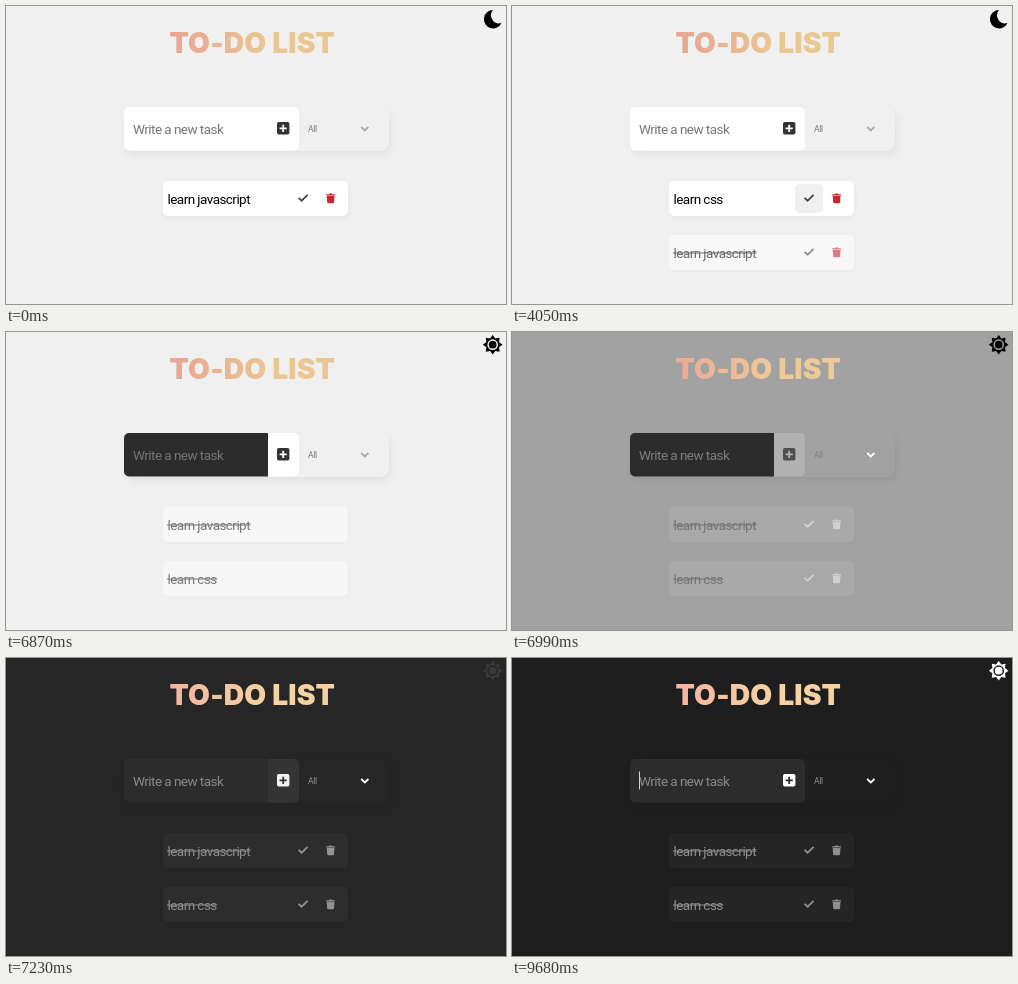
An HTML page for the animation above (9930 ms loop, 500 by 298 pixels).

```html
<!DOCTYPE html>
<html lang="en">
<head>
<meta charset="utf-8">
<title>To-do list</title>
<style>
  html, body { margin: 0; width: 100%; height: 100%; overflow: hidden; background: var(--bg); }
  svg { display: block; width: 500px; height: 298px; }
  text { font: 400 13.5px Roboto, sans-serif; letter-spacing: -.55px; white-space: pre; }
  .title { font: 900 28.2px Inter, sans-serif; letter-spacing: .2px; fill: url(#peach); }
  .small { font-size: 8.6px; letter-spacing: -.3px; fill: var(--all); }
  .panel { fill: var(--bg); filter: drop-shadow(2px 4px 4px rgba(0, 0, 0, .06)); }
  .field { fill: var(--field); }
  .button, .card { fill: var(--surface); }
  .card { filter: drop-shadow(1px 2px 2px rgba(0, 0, 0, .04)); }
  .hover { fill: var(--bg); }
  .label { fill: var(--text); }
  .line { fill: none; stroke-width: 1.8; }
  .strike { stroke: var(--text); stroke-width: 1; }
  .check { stroke: var(--icon); }
  .trash { fill: var(--trash); }
</style>
</head>
<body>
<svg viewBox="0 0 500 298">
  <defs>
    <linearGradient id="peach"><stop offset="0"/><stop offset=".6"/></linearGradient>
  </defs>
  <rect width="500" height="298" fill="var(--bg)"/>
  <text class="title" x="163.5" y="47.3">TO-DO LIST</text>

  <path id="moon" d="M487 4A9.2 9.2 0 1 0 495.5 17A8.1 8.1 0 0 1 487 4Z"/>
  <g id="sun" fill="var(--sun)">
    <path id="rays"/>
    <circle cx="486.7" cy="12.7" r="4.6" fill="none" stroke="var(--bg)" stroke-width="1.5"/>
  </g>

  <rect class="panel" x="118" y="101" width="265" height="44" rx="9"/>
  <path class="field" d="M262 101H123a5 5 0 0 0-5 5V139.5a5 5 0 0 0 5 5H262Z"/>
  <path class="button" d="M262 101H288a5 5 0 0 1 5 5V139.5a5 5 0 0 1-5 5H262Z"/>
  <text id="placeholder" x="127" y="128" fill="var(--hint)">Write a new task</text>
  <text id="typed" class="label" x="127" y="128"></text>
  <rect id="caret" class="label" y="113.5" width="1" height="18" opacity=".8"/>
  <rect id="plus" x="271" y="116" width="12.4" height="12.6" rx="1.8"/>
  <path class="line" stroke="var(--surface)" d="M273.6 122.3h7.2M277.2 118.7v7.2"/>
  <text class="small" x="302" y="126.2">All</text>
  <path class="line" stroke="var(--chevron)" d="M355.2 121l3.6 3.5 3.6-3.5"/>
  <g id="list"></g>
</svg>
<script>
const LOOP = 9930, TICK = 120, BLINK = 500;
const SENT = 2590, NIGHT = 6870, REFOCUS = 8680;
const $ = id => document.getElementById(id);
const root = document.documentElement;

// Transitions advance in ticks counted from these moments.
const transitions = [0, 2350, 3080, 3810, 4660, 6750];

// Grey levels as [light, dark, easing power].
const greys = {
  bg: [240, 30, 1], surface: [255, 44, 1], text: [0, 255, 1.3],
  hint: [117, 138, 1], all: [119, 145, 1], plus: [51, 255, 2]
};

// Time and number of characters in the input.
const draft = "learn css";
const keys = [[620, 0], [1240, 1], [1360, 3], [1480, 5], [2100, 8], [2350, 9], [SENT, 0], [REFOCUS, 0]];

const items = [
  { name: "learn javascript", added: 0, done: 3810, row: t => t >= 3810 && t < 4660 ? 1 : 0 },
  { name: "learn css", added: SENT, done: 4660, row: t => t >= 3810 && t < 4660 ? 0 : 1 }
];

const ramp = (t, from, to) => Math.min(1, Math.max(0, (t - from) / (to - from)));
const easeOut = p => 1 - (1 - p) ** 3;
const lerp = (a, b, k) => a + (b - a) * k;
const mix = (a, b, k) => `rgb(${a.map((v, i) => Math.round(lerp(v, b[i], k)))})`;
const grey = v => mix([v, v, v], [v, v, v], 0);
const show = (node, on) => node.style.display = on ? "" : "none";
const setColor = (name, color) => root.style.setProperty("--" + name, color);

for (const item of items) {
  const group = document.createElementNS("http://www.w3.org/2000/svg", "g");
  group.innerHTML = `
    <rect class="card" x="157" y="175" width="185" height="35" rx="5"/>
    <rect class="hover" x="283" y="178" width="28" height="29" rx="5"/>
    <text class="label" x="161.5" y="197.5">${item.name}</text>
    <path class="line strike"/>
    <path class="line check" d="M292.6 191.9l3 2.8 6-5.8"/>
    <path class="trash" d="M320.2 188.3h2.6l.6-.9h2.4l.6.9h2.6v1.3h-8.8ZM320.7 190.1h7.8l-.5 6.2q-.1.9-1 .9h-4.8q-.9 0-1-.9Z"/>`;
  $("list").append(group);
  item.group = group;
  item.label = group.querySelector("text");
  item.strike = group.querySelector(".strike");
  item.spot = group.querySelector(".hover");
}

$("rays").setAttribute("d", "M" + Array.from({ length: 16 }, (_, i) => {
  const r = i % 2 ? 6.8 : 9.8, a = i * Math.PI / 8;
  return `${486.7 + r * Math.cos(a)} ${12.7 + r * Math.sin(a)}`;
}).join("L") + "Z");

function drawTheme(t) {
  const dark = easeOut(ramp(t, NIGHT, NIGHT + 480) ** 1.4);
  const night = t >= NIGHT;
  for (const [name, [from, to, power]] of Object.entries(greys))
    setColor(name, grey(lerp(from, to, dark ** power)));
  setColor("field", grey(night ? 44 : 255));
  setColor("icon", grey(night ? 255 : 68));
  setColor("trash", night ? "#fff" : "#d4202c");
  setColor("chevron", grey(dark ? 255 : 170));
  setColor("sun", grey(255 * ramp(t, 6990, 8070)));
  show($("moon"), !night);
  show($("sun"), night);

  const [start, end] = document.querySelectorAll("stop");
  start.setAttribute("stop-color", mix([231, 164, 146], [244, 180, 160], dark));
  end.setAttribute("stop-color", mix([234, 198, 146], [246, 210, 163], dark));

  const glow = ramp(t, 2260, SENT) - ramp(t, 2960, 3320);
  const plus = lerp(51, 255, dark ** 2);
  $("plus").setAttribute("fill", mix([plus, plus, plus], [227, 143, 99], glow));
}

function drawInput(now) {
  const [since, count] = keys.findLast(([time]) => time <= now) ?? [0, 0];
  const focused = now >= keys[0][0] && now < SENT || now >= REFOCUS;
  $("typed").textContent = draft.slice(0, count);
  show($("placeholder"), !count);
  show($("caret"), focused && Math.floor((now - since) / BLINK) % 2 === 0);
  $("caret").setAttribute("x", 127 + (count ? $("typed").getComputedTextLength() + .5 : 0));
}

function drawItems(t) {
  const hover = ramp(t, 3200, 3440) - ramp(t, 5140, 5260);
  for (const { group, label, strike, spot, added, done, row } of items) {
    show(group, t >= added);
    group.setAttribute("transform", `translate(0 ${row(t) * 54})`);
    group.setAttribute("opacity", 1 - easeOut(ramp(t, done, done + 480)) / 2);
    strike.setAttribute("d", t >= done ? `M161 193h${label.getComputedTextLength() + 1}` : "");
    spot.setAttribute("opacity", row(t) ? 0 : hover);
  }
}

function frame() {
  const now = performance.now() % LOOP;
  const start = transitions.findLast(time => time <= now);
  const t = start + Math.floor((now - start) / TICK) * TICK;
  drawTheme(t);
  drawInput(now);
  drawItems(t);
  requestAnimationFrame(frame);
}
frame();
</script>
</body>
</html>
```
